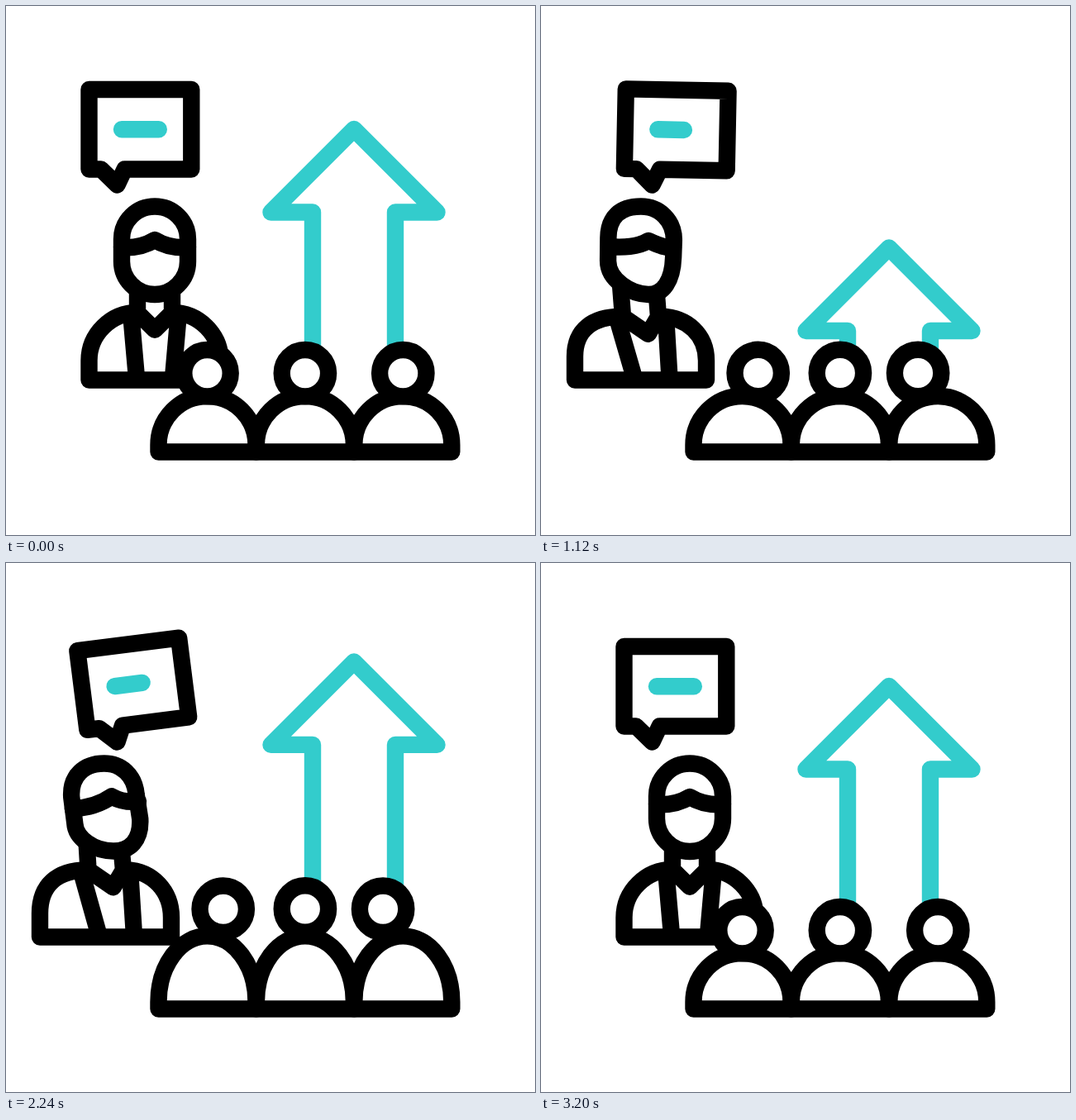
An HTML page for the animation above (3.6 s loop, 640 by 640 pixels).

```html
<!DOCTYPE html>
<html lang="en">
<head>
<meta charset="utf-8">
<title>Speaker and audience</title>
<style>
  html, body { margin: 0; width: 100%; height: 100%; overflow: hidden; background: #fff; }
  svg { display: block; width: 100%; height: 100%; }
  svg * { stroke-linecap: round; stroke-linejoin: round; }
</style>
</head>
<body>
<svg viewBox="0 0 640 640" fill="none" stroke="#000" stroke-width="20.4">
  <path id="arrow" stroke="#3cc"/>
  <g id="bubble">
    <path d="M100.5 101H224.3V197.5H143.5L134.5 216.5L115 197.5H100.5Z"/>
    <path id="dash" stroke="#3cc"/>
  </g>
  <g id="speaker"></g>
  <g id="crowd" fill="#fff"></g>
</svg>
<script>
const LOOP = 3600;
const $ = id => document.getElementById(id);

function add(parent, tag) {
  return parent.appendChild(document.createElementNS('http://www.w3.org/2000/svg', tag));
}

const ease = x => x * x * (3 - 2 * x);

// Eased value at time t through [time, value] keys.
function track(t, keys) {
  const i = keys.findIndex(k => k[0] > t);
  if (i < 0) return keys[keys.length - 1][1];
  if (i === 0) return keys[0][1];
  const [t0, v0] = keys[i - 1], [t1, v1] = keys[i];
  return v0 + (v1 - v0) * ease((t - t0) / (t1 - t0));
}

// Blends two path strings that share the same commands.
function blend(a, b, k) {
  const number = /-?\d+(\.\d+)?/g, goal = b.match(number);
  let i = 0;
  return a.replace(number, v => (+v + (goal[i++] - v) * k).toFixed(2));
}

// Each part: facing front, turned upright, turned and leaning back.
const parts = [
  ['M159 371C127 371 100.5 397 100.5 429L100.5 452.5L259.5 452.5L259.5 429C259.5 397 233 371 201 371',
   'M98 376C62 376 41 392 41 424L41 452.5L200 452.5L200 429C200 398 177 377 146 376',
   'M98 372C62 372 41 390 41 424L41 452.5L200 452.5L200 429C200 397 177 373 146 372'],
  ['M159 345L159 371L180 391.7L201 371L201 345',
   'M96 338L99 376L129.7 397L142 376L140 350',
   'M97.5 340L99.5 372L129.7 392.8L142 372L140 350'],
  ['M151.5 376L158 450', 'M93 381L113 450', 'M92 377L112.5 450'],
  ['M208.5 376L202 450', 'M151.5 382L155.5 450', 'M150.5 378L155 450'],
  ['M140 282C140 260 158 242.5 180 242.5C202 242.5 220 260 220 282L220 309C220 331 202 349 180 349C158 349 140 331 140 309Z',
   'M81.5 280C82 255 96 242.5 121 242.5C144 242.5 161 260 161 283L160 304C159 332 148 349 130 349C110 349 81 332 81 308Z',
   'M79.5 283C78 257 95 242.5 119 242.5C140 242.5 156 257 158 280L162 309C163 335 150 348.5 130 348.5C107 348.5 84 333 83 314Z'],
  ['M140 292C155 293 167 291 180 283C193 291 205 293 220 292',
   'M82 291C100 292 117 292 130 284C140 288 148 293 160 292.5',
   'M81 296.5C95 296 113 293 128 282.5C138 288 148 290 160 289']
].map(poses => ({ poses, node: add($('speaker'), 'path') }));

const crowd = [
  { x: 243.5, shift: 19.2, bob: 6.6 },
  { x: 361.9, shift: 0, bob: 9 },
  { x: 480.3, shift: -24.2, bob: 6.6 }
];
crowd.forEach(m => m.body = add($('crowd'), 'path'));
crowd.forEach(m => {
  m.head = add($('crowd'), 'circle');
  m.head.setAttribute('r', 28.2);
});

function draw(t) {
  const turn = track(t, [[0, 0], [500, 1], [2700, 1], [3200, 0]]);
  const tilt = track(t, [[0, 0], [550, -7.5], [1365, 3.5], [2175, -7.5], [2820, 3.5], [3200, 0]]);
  const drop = track(t, [[0, 0], [1400, 160], [2200, -30], [2800, 0]]);
  const rise = track(t, [[1400, 0], [2200, 21], [2800, 0]]);
  const dash = track(t, [[200, 44.8], [1130, 31.6], [1600, 44.8], [2120, 32.5], [2850, 44.8]]);

  $('bubble').setAttribute('transform', `rotate(${tilt} 134.5 216.5)`);
  $('dash').setAttribute('d', `M140 149.2h${dash}`);

  const wing = 249.5 + drop;
  $('arrow').setAttribute('d',
    `M371 440V${wing}H320.5L421 ${wing - 100.5}L521.5 ${wing}H471V440`);

  const lean = (1.5 - tilt) / 7.7;
  for (const { poses: [front, upright, back], node } of parts)
    node.setAttribute('d', blend(front, blend(upright, back, lean), turn));

  for (const m of crowd) {
    const bob = track(t, [[0, 0], [533, m.bob], [1067, 0], [1600, m.bob],
                          [2133, 4.6], [2667, m.bob], [3200, 0]]);
    m.body.setAttribute('d',
      `M${m.x - 59} 539.5V531A59 ${59 + rise} 0 0 1 ${m.x + 59} 531V539.5Z`);
    m.head.setAttribute('cx', m.x + m.shift * turn);
    m.head.setAttribute('cy', 444.2 - rise - bob);
  }
}

const start = performance.now();
function frame() {
  draw((performance.now() - start) % LOOP);
  requestAnimationFrame(frame);
}
draw(0);
requestAnimationFrame(frame);
</script>
</body>
</html>
```
